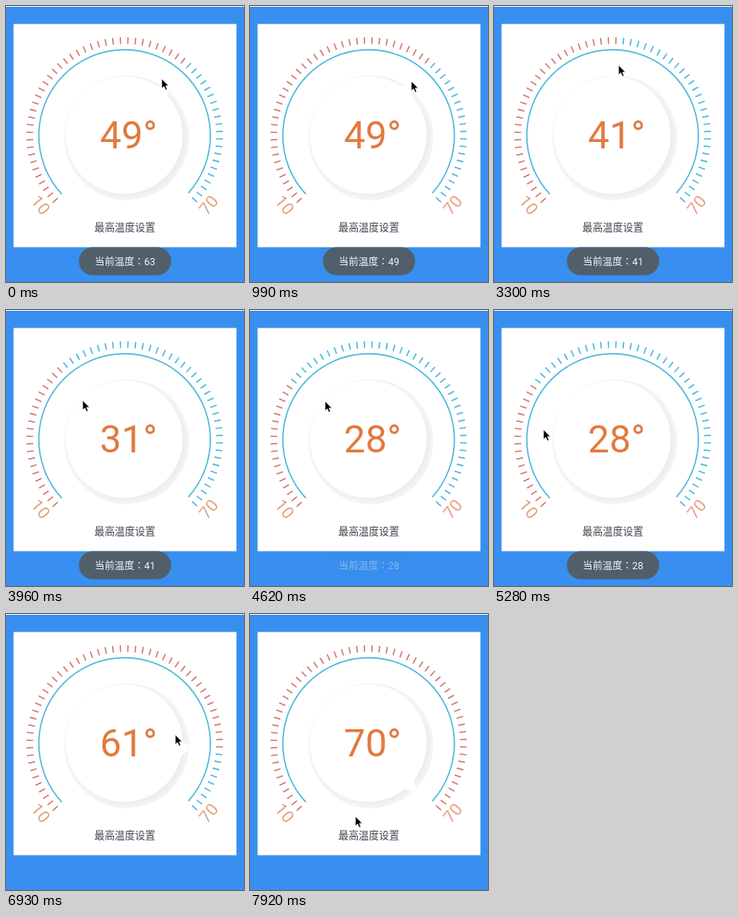
An HTML page that plays this animation: 298x345 px, repeating every 8 s.

```html
<!DOCTYPE html>
<html lang="zh-CN">
<head>
<meta charset="utf-8">
<title>温度控制</title>
<style>
html, body { margin: 0; width: 100%; height: 100%; overflow: hidden; background: #388ff0; }
svg { display: block; width: 298px; height: 345px; }
text { font-family: Roboto, "Noto Sans CJK SC", sans-serif; }
.tick { stroke: #48b8dc; stroke-width: 1.6; }
.tick.hot { stroke: #d4766e; }
.flag { font-size: 21px; fill: #e4a07e; text-anchor: middle; }
.title { font-size: 12.7px; font-weight: 500; fill: #3b434e; text-anchor: middle; }
.colon { font-family: "Noto Sans CJK TC", "Noto Sans CJK JP", sans-serif; }
</style>
</head>
<body>
<svg viewBox="0 0 298 345">
  <defs>
    <radialGradient id="shade" gradientUnits="userSpaceOnUse" cx="151.3" cy="164.6" r="78.2">
      <stop offset=".9" stop-color="#ececec"/>
      <stop offset=".95" stop-color="#f2f2f2"/>
      <stop offset="1" stop-color="#f5f5f5"/>
    </radialGradient>
  </defs>
  <rect width="298" height="345" fill="#388ff0"/>
  <rect width="298" height="1" fill="#fff"/>
  <rect x="9.5" y="22.5" width="279" height="279" fill="#fff"/>
  <g id="dial" transform="translate(148.5 162)">
    <path id="arc" fill="none" stroke="#48b8dc" stroke-width="1.6"/>
    <text class="flag" y="143.7" transform="rotate(50.5)">10</text>
    <text class="flag" y="143.7" transform="rotate(-50.5)">70</text>
  </g>
  <circle cx="151.3" cy="164.6" r="78.2" fill="url(#shade)"/>
  <circle cx="148" cy="161.5" r="73.3" fill="#fff"/>
  <path id="mark" d="M-12-71Q-5-75-3-82H3Q5-75 12-71Z" fill="#fff"/>
  <text id="temp" x="117.5" y="178.2" font-size="48" fill="#e27a3f"></text>
  <text class="title" x="148.8" y="280.8">最高温度设置</text>
  <rect id="pill" x="91.2" y="301.4" width="115.6" height="35.2" rx="17.6" fill="#505f69"/>
  <text id="note" x="111" y="323.8" font-size="12.4" fill="#f4f6f6">当前温度<tspan class="colon" lang="zh-TW">：</tspan><tspan id="value"></tspan></text>
  <path id="cursor" d="M0 0V12L2.8 9.6L4.8 14L6.8 13.1L4.9 8.8H8.6Z" fill="#000" stroke="#fff" stroke-width=".7"/>
</svg>
<script>
const STEP = 330, LOOP = 8000, MIN = 10, TICKS = 60, RATE = 4.5;
const TOAST_LIFE = 2200, FADE = 250;
const $ = id => document.getElementById(id);
const clamp = v => Math.min(1, Math.max(0, v));

// Key points: time in ms, then values joined by straight moves.
const tempKeys = [[-1000, 63], [0, 49], [990, 49], [1520, 41], [3600, 41], [4070, 28],
  [5790, 28], [6270, 47], [6370, 47], [7270, 70]];
const cursorKeys = [[330, 195, 91], [660, 203, 95], [990, 202, 94], [1500, 156, 74],
  [3500, 156, 74], [3960, 96, 113], [4620, 94, 114], [4950, 69, 146], [5610, 55, 153],
  [6270, 156, 111], [6930, 212, 151], [7260, 144, 241], [7590, 132, 253]];
const toastStarts = [-1000, 330, 2640, 4620];

function track(keys, t) {
  const next = keys.findIndex(key => key[0] > t);
  if (next === 0) return keys[0].slice(1);
  if (next < 0) return keys.at(-1).slice(1);
  const [t0, ...from] = keys[next - 1], [t1, ...to] = keys[next];
  const p = (t - t0) / (t1 - t0);
  return from.map((v, i) => v + (to[i] - v) * p);
}
const tempAt = t => Math.round(track(tempKeys, t)[0]);

function polar(r, deg) {
  const a = deg * Math.PI / 180;
  return `${r * Math.cos(a)} ${r * Math.sin(a)}`;
}
$('arc').setAttribute('d', `M${polar(107.4, 137)}A107.4 107.4 0 1 1 ${polar(107.4, 42)}`);

const ticks = Array.from({ length: TICKS }, (_, i) => {
  const line = document.createElementNS('http://www.w3.org/2000/svg', 'line');
  line.setAttribute('class', 'tick');
  line.setAttribute('y1', -123);
  line.setAttribute('y2', -114.6);
  line.setAttribute('transform', `rotate(${-133 + i * RATE})`);
  $('dial').append(line);
  return line;
});

function drawToast(t) {
  const start = toastStarts.findLast(s => s <= t);
  const age = t - start;
  const fade = clamp((TOAST_LIFE - age) / FADE);
  $('value').textContent = tempAt(start);
  $('pill').setAttribute('opacity', fade * clamp(.03 + age / FADE));
  $('note').setAttribute('opacity', fade * clamp(.4 + age / FADE));
}

function draw(t) {
  const temp = tempAt(t);
  $('temp').textContent = temp + '°';
  ticks.forEach((line, i) => line.classList.toggle('hot', i < temp - MIN));
  $('mark').setAttribute('transform', `translate(148 161.5) rotate(${(temp - MIN) * RATE - 135})`);
  $('cursor').setAttribute('transform', `translate(${track(cursorKeys, t)})`);
  drawToast(t);
}

let shown = -1;
function loop() {
  const step = Math.floor(performance.now() % LOOP / STEP);
  if (step !== shown) draw(step * STEP);
  shown = step;
  requestAnimationFrame(loop);
}
loop();
</script>
</body>
</html>
```
